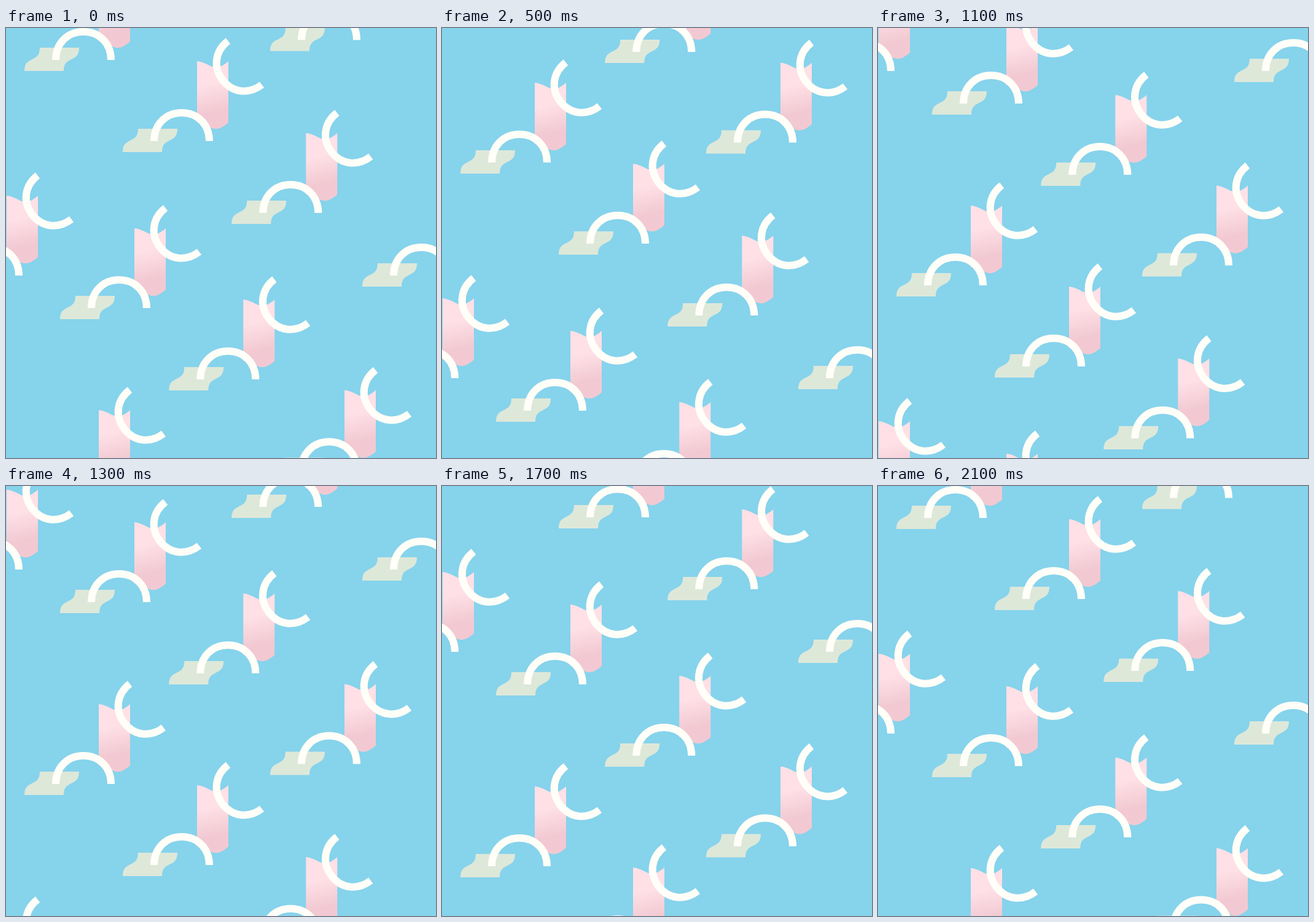
Recreate the animation shown at these times as an HTML page with a canvas. Size 700 by 700 pixels, loop 2200 ms.

```html
<!DOCTYPE html>
<html lang="en">
<head>
<meta charset="utf-8">
<title>Falling shapes</title>
<style>
  html, body { margin: 0; width: 100%; height: 100%; overflow: hidden; background: #86d3ec; }
  canvas { display: block; width: 700px; height: 700px; }
</style>
</head>
<body>
<canvas id="stage" width="700" height="700"></canvas>
<script>
const SIZE = 700, LOOP = 2200, TICK = 100, STEP = SIZE / 21;
const ctx = document.getElementById('stage').getContext('2d');

// Top left corner of each group at the start of the loop
const groups = [
  [30, 32], [190, 164], [367.3, 281], [580, 383],
  [88, 436], [265.3, 552], [430, 699.6]
];

const base = new Path2D('M25 0H89C89 26 64 12 64 38H0C0 12 25 26 25 0Z');
const flag = new Path2D('M121 -110c22 2 26 22 51 0V-10c-25 22 -29 2 -51 0Z');
const arch = new Path2D('M-45 0C-45 -27 -26 -46 0 -46C26 -46 45 -27 45 0');

const pink = ctx.createLinearGradient(140, -72, 150, -28);
pink.addColorStop(0, '#fee0e6');
pink.addColorStop(1, '#f2c9d2');

function drawArch(x, y, turn) {
  ctx.save();
  ctx.translate(x, y);
  ctx.rotate(turn);
  ctx.stroke(arch);
  ctx.restore();
}

function drawGroup(x, y) {
  ctx.save();
  ctx.translate(x, y);
  ctx.fillStyle = '#dde8d9';
  ctx.fill(base);
  ctx.fillStyle = pink;
  ctx.fill(flag);
  drawArch(96, 20, 0);
  drawArch(199, -107.3, -127.6 * Math.PI / 180);
  ctx.restore();
}

function draw(now) {
  const shift = Math.round(Math.floor(now % LOOP / TICK) * STEP);
  ctx.fillStyle = '#86d3ec';
  ctx.fillRect(0, 0, SIZE, SIZE);
  ctx.strokeStyle = '#fffef8';
  ctx.lineWidth = 12;
  for (const [x, y] of groups) {
    const top = (y + shift) % SIZE;
    for (const dx of [0, -SIZE]) {
      for (const dy of [-SIZE, 0, SIZE]) drawGroup(x + dx, top + dy);
    }
  }
}

const start = performance.now();
function loop() {
  draw(performance.now() - start);
  requestAnimationFrame(loop);
}
loop();
</script>
</body>
</html>
```
